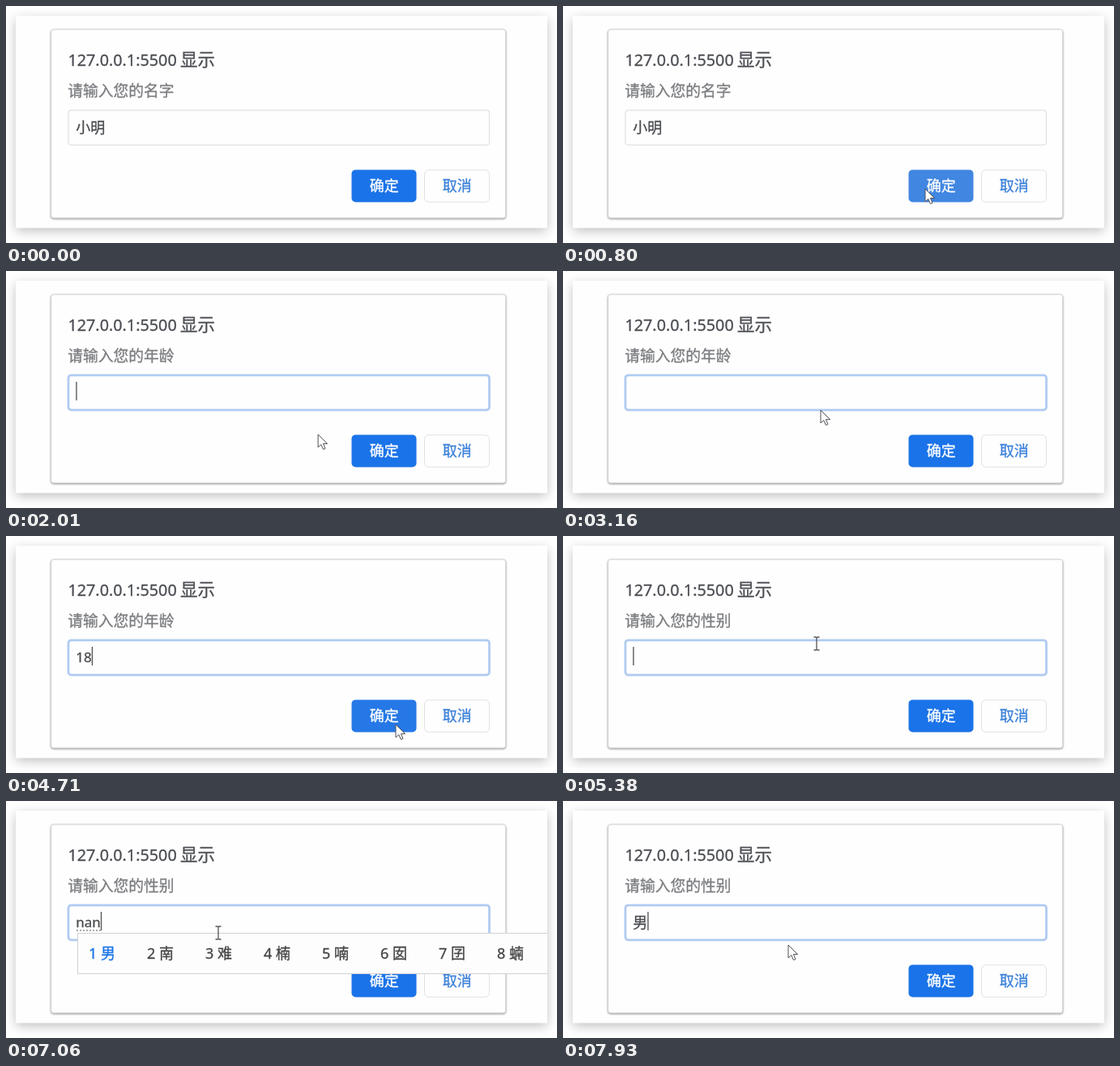
An HTML page that plays this animation: 680x293 px, repeating every 8 s.

```html
<!DOCTYPE html>
<html lang="zh-CN">
<head>
<meta charset="utf-8">
<style>
  html, body { margin: 0; width: 100%; height: 100%; overflow: hidden; background: #fff; }
  svg { display: block; width: 680px; height: 293px; }
  text { font-family: "Noto Sans", "Open Sans", "Noto Sans CJK SC", "Noto Sans CJK", sans-serif; font-size: 18px; white-space: pre; fill: var(--ink); stroke: var(--ink); stroke-width: .3px; }
  .card { filter: drop-shadow(0 4px 7px rgba(0, 0, 0, .24)); }
  .dialog { filter: drop-shadow(.3px 1.5px 1.2px rgba(0, 0, 0, .42)); }
</style>
</head>
<body>
<svg viewBox="0 0 680 293">
  <clipPath id="screen"><rect x="12" y="12" width="656" height="262.5"/></clipPath>
  <rect class="card" x="12" y="12" width="656" height="262.5" fill="#fefefe"/>
  <g clip-path="url(#screen)">
    <rect class="dialog" x="55.7" y="29" width="561" height="233" rx="3" fill="#fefefe" stroke="#d4d4d4"/>
    <g style="--ink:#4b4e53">
      <text x="76.4" y="74" style="font-size:19.8px">127.0.0.1:5500</text>
      <text x="215" y="74.1" style="font-size:21.5px">显示</text>
    </g>
    <text id="label" x="76.2" y="112.4" style="--ink:#7b7d80; font-size:18.8px"></text>
    <rect id="field" x="77" y="128.8" width="519.5" height="43" rx="3.5" fill="#fefefe"/>
    <text id="value" x="86.2" style="--ink:#4a4c50"></text>
    <path id="underline" stroke="#555" stroke-dasharray="2 2"/>
    <rect id="caret" y="137" width="1.3" height="23" fill="#505050"/>
    <rect id="ok" x="426.5" y="202.4" width="80" height="40" rx="5"/>
    <text x="448.8" y="228.7" style="--ink:#fff">确定</text>
    <rect x="516.5" y="202.8" width="80" height="39.5" rx="5" fill="#fefefe" stroke="#dfe1e5"/>
    <text x="538.8" y="228.7" style="--ink:#3b80d9">取消</text>
    <g id="ime">
      <rect x="88.5" y="163.5" width="600" height="50" fill="#fdfdfd" stroke="#d2d2d2"/>
    </g>
    <g id="pointer">
      <path id="arrow" d="M0 0V16L3.8 12.6L6.4 18.6L9 17.5L6.4 11.6H11.6Z" fill="#fefefe" stroke="#505058" stroke-linejoin="round"/>
      <path id="beam" d="M-3.5-8H-1L0-7L1-8H3.5M0-7V7M-3.5 8H-1L0 7L1 8H3.5" fill="none" stroke="#555" stroke-width="1.3"/>
      <circle id="press" cx="-1" r="15.5" fill="#f2e243" fill-opacity=".66"/>
    </g>
  </g>
</svg>
<script>
const LOOP = 8000, BLINK = 530;
const $ = id => document.getElementById(id);
const show = (id, on) => $(id).setAttribute('visibility', on ? 'visible' : 'hidden');
const set = (id, attrs) => { for (const k in attrs) $(id).setAttribute(k, attrs[k]); };
const clamp = v => Math.max(0, Math.min(1, v));
const ease = u => u * u * (3 - 2 * u);

// Each dialog: opening time, question, time the pointer reaches and leaves its button
const dialogs = [
  { at: 0, ask: '名字', over: [600, 1640], click: [1395, 1640] },
  { at: 1565, ask: '年龄', over: [4660, 4980], click: [4905, 4970] },
  { at: 4935, ask: '性别' }
];
const keys = [
  { at: 0, text: '小明' }, { at: 1565, text: '' },
  { at: 3355, text: '1' }, { at: 3555, text: '18' }, { at: 4935, text: '' },
  { at: 6855, text: 'n' }, { at: 6925, text: 'na' }, { at: 7055, text: 'nan' }, { at: 7455, text: '男' }
];
// Pointer moves with rests between them
const moves = [
  { from: 255, to: 800, x: 447, y: 226 },
  { from: 1000, to: 1070, x: 454, y: 228 },
  { from: 1650, to: 2080, x: 380, y: 200 },
  { from: 2180, to: 2680, x: 318, y: 172 },
  { from: 4130, to: 4710, x: 481, y: 233, sag: 46 },
  { from: 4910, to: 5050, x: 326, y: 130 },
  { from: 5330, to: 5380, x: 313, y: 133 },
  { from: 5800, to: 6150, x: 275, y: 158 },
  { from: 7000, to: 7060, x: 262, y: 163 },
  { from: 7800, to: 7925, x: 278, y: 178 }
];

const latest = (list, t) => list.filter(k => k.at <= t).pop();
const within = (t, span) => !!span && t >= span[0] && t < span[1];

function pointerAt(t) {
  let x = 408, y = 276;
  for (const m of moves) {
    const u = ease(clamp((t - m.from) / (m.to - m.from)));
    x += (m.x - x) * u;
    y += (m.y - y) * u + (m.sag || 0) * Math.sin(Math.PI * u);
  }
  return [x, y];
}

[...'男南难楠喃囡囝蝻'].forEach((c, i) => {
  $('ime').insertAdjacentHTML('beforeend',
    `<text x="${102 + i * 72}" y="195" style="--ink:${i ? '#444' : '#1a73e8'}">${i + 1} ${c}</text>`);
});

function draw(t) {
  const { at, text } = latest(keys, t), { ask } = latest(dialogs, t);
  const latin = /\w/.test(text), composing = /[a-z]/.test(text);
  const focused = t >= dialogs[0].click[0];

  $('label').textContent = '请输入您的' + ask;
  $('value').textContent = text;
  $('value').style.fontSize = latin ? '17px' : '18px';
  set('value', { y: latin ? 156.3 : 156.8 });
  set('field', { stroke: focused ? '#b0cbf1' : '#dfe1e5', 'stroke-width': focused ? 2.8 : 1.2 });

  const caretX = 86.3 + (text && $('value').getComputedTextLength());
  set('caret', { x: caretX });
  show('caret', focused && (composing || !at || Math.floor((t - at) / BLINK) % 2 === 0));
  set('underline', { d: `M87 160H${caretX}` });
  show('underline', composing);
  show('ime', composing);

  const hover = Math.max(...dialogs.map(({ over }) =>
    over ? clamp(Math.min((t - over[0]) / 180, (over[1] - t) / 60)) : 0));
  const mix = (a, b) => Math.round(a + (b - a) * hover);
  set('ok', { fill: `rgb(${mix(26, 65)},${mix(115, 134)},${mix(232, 225)})` });

  const [x, y] = pointerAt(t);
  const overField = y > 128 && y < 171.5;
  set('pointer', { transform: `translate(${x} ${y})` });
  show('beam', overField);
  show('arrow', !overField);
  show('press', dialogs.some(d => within(t, d.click)));
}

function frame() {
  draw(performance.now() % LOOP);
  requestAnimationFrame(frame);
}
frame();
</script>
</body>
</html>
```
